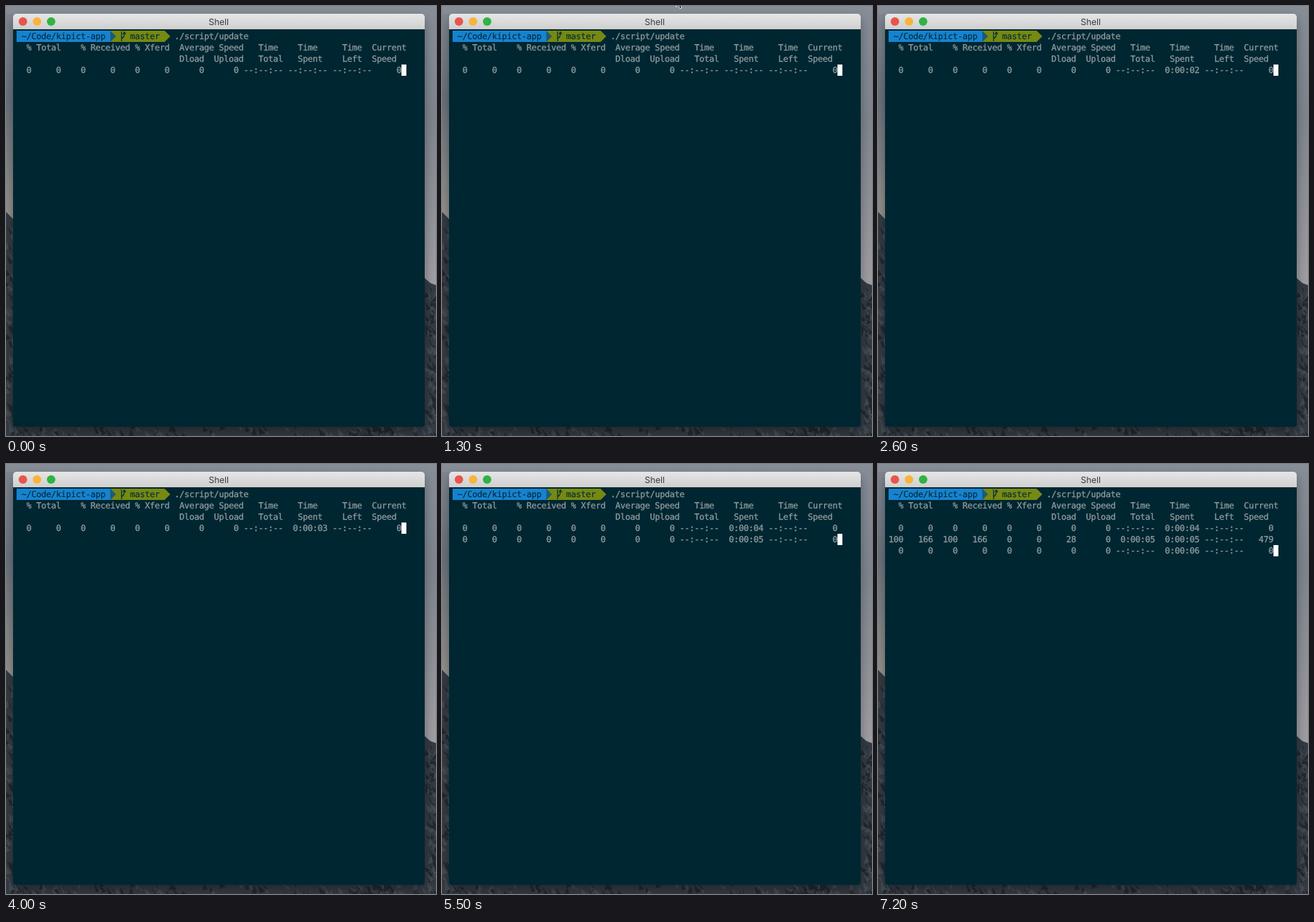
An HTML page for the animation above (8 s loop, 610 px wide and 610 px high).

```html
<!DOCTYPE html>
<html lang="en">
<head>
<meta charset="utf-8">
<title>Shell</title>
<style>
  html, body { margin: 0; width: 100%; height: 100%; overflow: hidden; background: #23282f; }
  svg { display: block; }
  text { white-space: pre; text-rendering: geometricPrecision; }
  .mono {
    font: 12px "DejaVu Sans Mono", monospace; letter-spacing: -.2246px;
    fill: #8d9b9c; stroke: #8d9b9c; stroke-width: .3px;
  }
  .mono .dark { fill: #062b38; stroke: #062b38; stroke-width: .15px; }
  .title { font: 12.4px Inter, sans-serif; fill: #3c3c3c; text-anchor: middle; }
</style>
</head>
<body>
<svg width="610" height="610" viewBox="0 0 610 610">
  <defs>
    <linearGradient id="sky" x2="0" y2="1">
      <stop offset="0" stop-color="#878e98"/>
      <stop offset=".25" stop-color="#7f848e"/>
      <stop offset=".65" stop-color="#a09fa3"/>
    </linearGradient>
    <linearGradient id="haze" x2="0" y2="1">
      <stop offset="0" stop-color="#7f8791"/>
      <stop offset=".4" stop-color="#69727c"/>
      <stop offset="1" stop-color="#98968f"/>
    </linearGradient>
    <linearGradient id="bar" x2="0" y2="1">
      <stop stop-color="#e6e6e6"/>
      <stop offset="1" stop-color="#cfcfcf"/>
    </linearGradient>
    <filter id="shadow" x="-10%" y="-10%" width="120%" height="120%">
      <feDropShadow dx="0" dy="7" stdDeviation="8" flood-opacity=".35"/>
    </filter>
  </defs>

  <rect width="610" height="610" fill="url(#sky)"/>
  <rect y="11" width="12" height="300" fill="url(#haze)"/>
  <path d="M0 292L10 302 300 470 594 386 602 393 610 396V610H0Z" fill="#343b44"/>
  <g id="rocks"></g>

  <g filter="url(#shadow)">
    <path d="M10 33V16a5 5 0 0 1 5-5H589a5 5 0 0 1 5 5V33Z" fill="url(#bar)"/>
    <path d="M10 33H594V593a4 4 0 0 1-4 4H14a4 4 0 0 1-4-4Z" fill="#002731"/>
  </g>
  <circle cx="24" cy="22" r="6" fill="#e9544b"/>
  <circle cx="44" cy="22" r="6" fill="#f8b43c"/>
  <circle cx="64" cy="22" r="6" fill="#2fb344"/>
  <text class="title" x="301.700" y="27">Shell</text>

  <path d="M148 35H225L233 43 225 51H148Z" fill="#768912"/>
  <path d="M15 35H148V51H15Z" fill="#1583d0"/>
  <path d="M148 35L156 43 148 51Z" fill="#1b5a78"/>
  <path d="M164 36V50M164 46Q168 45 168 38M166 40L168 37 170 40"
        fill="none" stroke="#062b38" stroke-width="1.300"/>
  <g class="mono">
    <text class="dark" x="22" y="47">~/Code/kipict-app</text>
    <text class="dark" x="176" y="47">master</text>
    <text x="239" y="47">./script/update</text>
    <text x="15" y="63">  % Total    % Received % Xferd  Average Speed   Time    Time     Time  Current</text>
    <text x="15" y="79">                                 Dload  Upload   Total   Spent    Left  Speed</text>
    <text class="row" x="15" y="95"></text>
    <text class="row" x="15" y="111"></text>
    <text class="row" x="15" y="127"></text>
  </g>
  <rect id="caret" width="7" height="16" fill="#fff"/>
  <path id="pointer" d="M0 0V14.500L3.300 11.400 5.600 16.600 8 15.600 5.800 10.500H10.300Z"
        fill="#111" stroke="#fff" stroke-width=".9"/>
</svg>
<script>
const $ = id => document.getElementById(id);
const rows = document.querySelectorAll('.row');
const LOOP = 8000, NONE = '--:--:--';
const POINTER_START = 700, POINTER_STEP = 100;
const pointerPath = [[24, 36], [150, 17], [263, 0], [300, -5], [318, -9], [328, -11],
                     [332, -13], [339, -13], [343, -14], [344, -15], [345, -16]];

// Rough facets on the mountainside
let seed = 7;
const random = () => (seed = seed * 16807 % 2147483647) / 2147483647;
function addRocks(count, x, y, w, h) {
  for (let i = 0; i < count; i++) {
    const px = x + random() * w, py = y + random() * h;
    const rock = document.createElementNS('http://www.w3.org/2000/svg', 'path');
    rock.setAttribute('d', `M${px} ${py}l${3 + random() * 8} ${4 + random() * 7}l${-9 * random()} 3Z`);
    rock.setAttribute('fill', random() < .6 ? '#22282f' : '#434a52');
    $('rocks').append(rock);
  }
}
addRocks(60, -4, 306, 12, 300);
addRocks(80, 593, 398, 16, 208);
addRocks(110, 0, 592, 610, 14);

const seconds = n => '0:00:0' + n;
function progress(spent, size = 0, total = NONE, average = 0, speed = 0) {
  const percent = size ? 100 : 0;
  const cells = [percent, size, percent, size, 0, 0, average, 0, total, spent, NONE, speed];
  const widths = [3, 6, 5, 6, 5, 6, 7, 7, 9, 9, 9, 6];
  return cells.map((cell, i) => String(cell).padStart(widths[i])).join('');
}

// Value of the last [time, value] pair already reached
const at = (t, ...keys) => keys.filter(([start]) => t >= start).pop()[1];

function draw() {
  const t = performance.now() % LOOP;
  const lines = [
    progress(at(t, [0, NONE], [1700, seconds(1)], [2600, seconds(2)], [4000, seconds(3)], [4200, seconds(4)])),
    at(t, [0, ''], [5500, progress(seconds(5))], [5800, progress(seconds(5), 166, seconds(5), 28, 479)]),
    at(t, [0, ''], [5900, progress(seconds(5))], [7000, progress(seconds(6))])
  ];
  lines.forEach((line, i) => { if (rows[i].textContent !== line) rows[i].textContent = line; });

  const [column, row] = at(t, [0, [78, 3]], [4300, [0, 4]], [5500, [78, 4]], [5900, [78, 5]]);
  $('caret').setAttribute('x', 15 + column * 7);
  $('caret').setAttribute('y', 35 + row * 16);

  const spot = pointerPath[Math.floor((t - POINTER_START) / POINTER_STEP)];
  $('pointer').setAttribute('visibility', spot ? 'visible' : 'hidden');
  if (spot) $('pointer').setAttribute('transform', `translate(${spot})`);
  requestAnimationFrame(draw);
}
draw();
</script>
</body>
</html>
```
